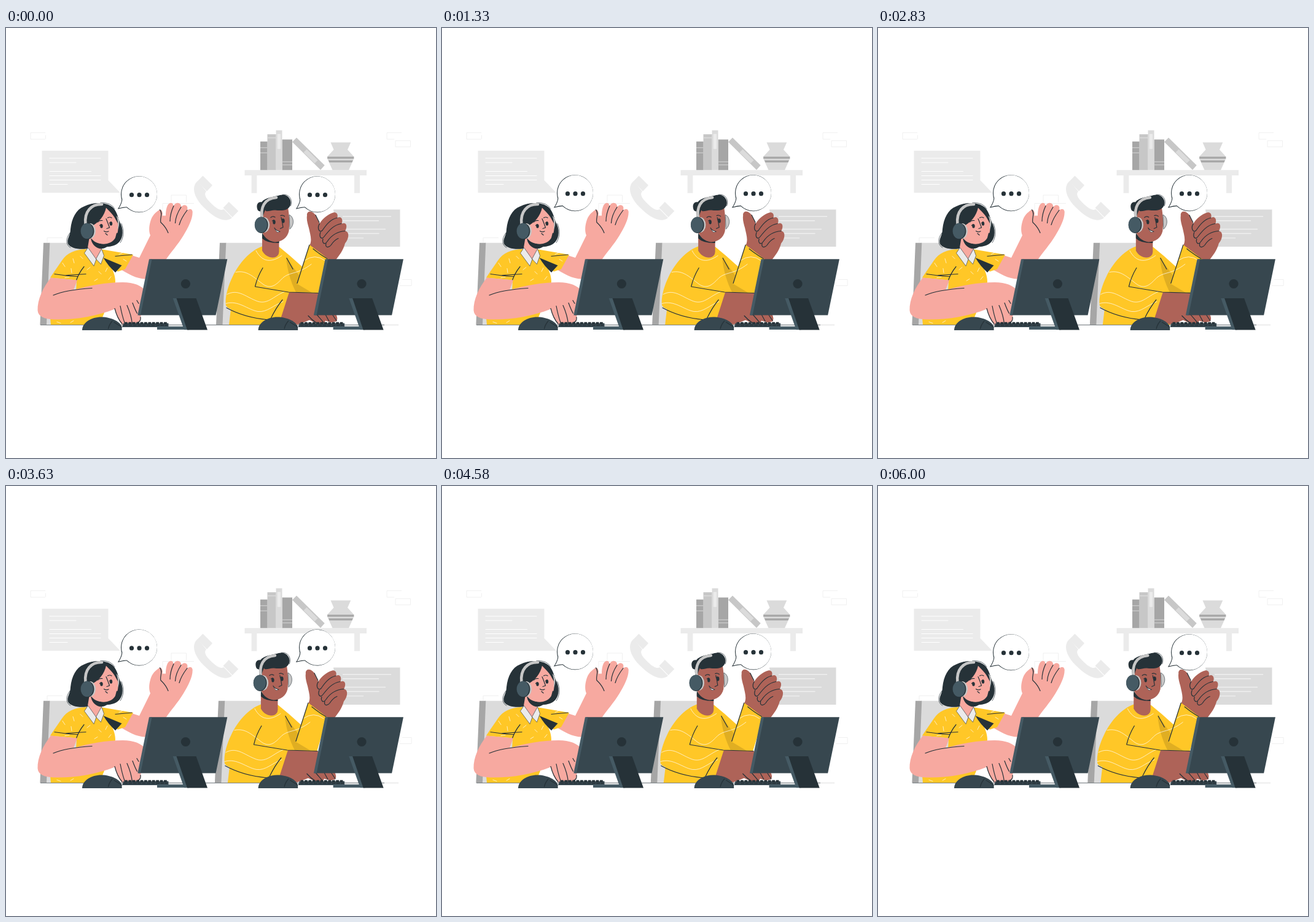
Animation of 700x700 px, one loop 6040 ms. Source, as an HTML page:

```html
<!DOCTYPE html>
<html lang="en">
<head>
<meta charset="utf-8">
<title>Support desk</title>
<style>
  html, body { margin: 0; width: 100%; height: 100%; overflow: hidden; background: #fff; }
  svg { display: block; width: 100vw; height: 100vh; }
  .ink { fill: #263238; }
  .slate { fill: #37474f; }
  .steel { fill: #455a64; }
  .g1 { fill: #ebebeb; }
  .g2 { fill: #dbdbdb; }
  .g3 { fill: #c7c7c7; }
  .g4 { fill: #a6a6a6; }
  .yellow { fill: #ffc727; }
  .rose { fill: #f7a9a0; }
  .brown { fill: #ae6358; }
  .line { fill: none; stroke: #263238; stroke-width: 1.2; stroke-linecap: round; stroke-linejoin: round; }
  .pale { fill: none; stroke: #fff; stroke-width: 1; stroke-linecap: round; }
  .thin { stroke-width: .7; }
  .faint { fill: none; stroke: #f0f0f0; stroke-width: 1; }
  .band { fill: none; stroke: #c7c7c7; stroke-width: 4.6; stroke-linecap: round; }
</style>
</head>
<body>
<svg viewBox="0 .5 700 700">
  <defs>
    <g id="bubble">
      <circle class="ink" cx="216.5" cy="271.2" r="29.5"/>
      <path class="ink" d="M188.6 279 Q187.5 287 181.8 295.3 Q190 293.2 197.5 292.6Z"/>
      <circle cx="217" cy="271.1" r="29" fill="#fff"/>
      <path d="M189.6 279 Q188.5 287 183.8 293.8 Q190 291.9 198.5 291.4Z" fill="#fff"/>
      <circle class="ink" cx="204.5" cy="272.2" r="3.6"/>
      <circle class="ink" cx="217" cy="272.2" r="3.6"/>
      <circle class="ink" cx="229.5" cy="272.2" r="3.6"/>
    </g>
    <g id="desk">
      <path class="slate" d="M189 487.5 L191 481 H264.5 V487.5Z"/>
      <path d="M193 481 H263" stroke="#263238" stroke-width="3.4" stroke-dasharray="4.8 1.6"/>
      <path d="M192 484.5 H263" stroke="#263238" stroke-width="1.6" stroke-dasharray="6 1.4"/>
      <path class="steel" d="M246 486.3 H294 V491.5 H246Z"/>
      <path class="slate" d="M235 376.7 H360.3 L341.5 468 H216Z"/>
      <path class="steel" d="M233 376.7 H237.6 L219 468 H214.3Z"/>
      <circle class="ink" cx="292.4" cy="417" r="7.6"/>
      <path class="steel" d="M271.7 440.6 H280 L298 491.8 H290Z"/>
      <path class="ink" d="M277.5 440.6 H309.5 L328 492 H295Z"/>
      <path class="slate" d="M124 492.5 C124 480 139 471 155 471 C172 471 187 479 188.600 488 V492.500Z"/>
      <path class="line" d="M173 477.5 Q168 483 166.5 490 M176 479.5 L188 487"/>
    </g>
    <g id="cup">
      <ellipse class="g3" cx="137" cy="331" rx="9" ry="12.5"/>
      <ellipse class="ink" cx="132.6" cy="331.2" rx="10.8" ry="13.2"/>
      <ellipse class="steel" cx="131.8" cy="331" rx="10.2" ry="12.7"/>
    </g>
  </defs>

  <!-- wall -->
  <path class="faint" d="M64 171 H40 V181.5 H64 M64.5 175 V181 M644 171 H620 V181.5 H632 M634 184 H658.5 V194 H634Z M269 284 V272.5 H293.5 V284 M67 350 V342 H92 M255 296 V286 H306 M645 410 H660 V420 H641"/>
  <path class="g1" d="M58.5 200.300 H166.5 V248.500 L186 268.700 H58.500Z"/>
  <path class="pale" d="M71 212.500 H154 M71 219.500 H114 M71 234 H138.500 M71 241 H154 M71 248 H154 M71 255 H100"/>
  <path class="g1" d="M388.5 231.700 H587 V240.500 H576 V269.300 H567 V240.500 H408.400 V269.300 H399.600 V240.500 H388.500Z"/>
  <path class="g4" d="M414 185.200 H425.700 V231.700 H414Z M449.500 182 H466 V231.700 H449.500Z"/>
  <path class="g3" d="M425.500 173.600 H439.700 V231.700 H425.500Z M414 194.500 H425.500 V196 H414Z M414 203 H425.500 V204.500 H414Z M449.500 217.500 H466 V219 H449.500Z M449.500 222.500 H466 V224 H449.500Z"/>
  <path class="g2" d="M439.500 167 H449.500 V231.700 H439.500Z M425.500 178.500 H439.500 V180 H425.500Z"/>
  <path class="g1" d="M441.700 173 H447.200 V197.300 H441.700Z"/>
  <path class="g3" d="M473 179 L518.700 224 L512 231.500 L466 186Z"/>
  <path class="g2" d="M489.500 198 L507.500 215.700 L502.500 220.800 L484.500 203Z"/>
  <path class="g2" d="M528.500 186.700 H561.300 L556 198.400 L566.400 210 V213 L558 231.700 H531.500 L523 213 V210 L533.600 198.400Z"/>
  <path class="g4" d="M523.200 209.900 H566.300 V213.200 H523.200Z M525 216 H564.800 L563.400 219.300 H526.400Z"/>
  <g class="g1">
    <path d="M312 249.500 C301 259 306 276 321 291.500 C338 309 356 319 368 309.500 L354.500 295.500 C349 299 341 293 334 286 C327 279 321 272 326 266.500Z"/>
    <path d="M320.500 240.900 L336 256.500 L327 266.200 L311.500 250.200Z M362.800 283.500 L378.300 298.600 L368.500 308.400 L353.600 293.200Z"/>
  </g>
  <path class="g2" d="M533 295.900 H641.500 V356.400 H541Z"/>
  <path d="M548 307.300 H627 M548 314.300 H607 M548 328 H618 M548 335 H607.500 M548 342.400 H582" stroke="#f0f0f0" stroke-width="1.400"/>
  <path d="M56 483.900 H616" stroke="#5b6468" stroke-width=".9"/>
  <path d="M616 483.900 H639" stroke="#d6d6d6" stroke-width=".8"/>

  <!-- woman -->
  <path class="g2" d="M70 350.300 H128 V483.500 H65Z"/>
  <path class="g4" d="M61 350.300 H71.300 L66 483.500 H55.400Z"/>
  <path class="ink" d="M127 291 C143 283 164 284 173 292 C181 299 182 311 187 320 C192 332 190 345 182 351 C175 357 160 358 150 356 L138 359 C121 362 106 360 101 352 C98 344 105 339 105 328 C107 310 114 296 127 291Z"/>
  <path class="line thin" d="M188 319 C193 332 191 343 186 350 M104 334 C97 343 97 354 105 358 M154 285 Q171 284 177 295"/>
  <path class="rose" d="M203 370 L217 374.500 L235 338 C232 331 233 322 235.500 314 C238 306 243 301 249 297 C253 294 256 300 254.500 306 L260 306 C260 297 262 287 267 285.500 C271 284.500 273 287 272 292 C274 286 280 283 284 287.500 C285.500 289 285 291 284.500 293 C287 288 293 287 295 291.500 C296 294 295 296 294.500 298.500 C298 293.500 303 294.500 303.700 299.500 C304 312 296 326 289 338 C280 353 268 366 260 378 L250 405 L228 409 C212 409 199 401 183 391Z"/>
  <path class="yellow" d="M130 360.500 C112 361 99 367 91 379 C83 391 77 399 72 407 L115 411 L114 430 L72 472 L73 483.500 H152 L170 440 L178 414 C178 404 175 398 171 388 L182 397 L194 393 L207 369.500 L157 361Z"/>
  <path class="ink" d="M158.500 374.500 L188.500 387 L178 398.500 C171 392 164 384 158.500 374.500Z"/>
  <path class="rose" d="M136 340 L133 358 C137 369 142 374 146 377 C151 373 155 366 156 360 L158 345Z"/>
  <path class="ink" d="M138 342 C145 351 153 354 171 350 C167 356 160 361 152 359.500 C144 357 139 351 138 342Z"/>
  <path class="rose" d="M163 293 C174 298 179 306 182 316 C184 327 182 339 175 346 C167 354 152 354 144 347 C139 342 140 330 143 321 C151 316 160 307 163 293Z"/>
  <path class="ink" d="M160 289 C165 297 173 301 179 313 L184 322 C184 309 180 299 173 292Z"/>
  <path class="g3" d="M179.500 306 C185 310 186 321 181.500 329 C183 321 182.500 314 179.500 306Z"/>
  <path d="M180 334 C187 336 184 348 176 350Z" class="ink"/>
  <path class="band" d="M129.500 320 C127 299 139 287 156 287.500"/>
  <use href="#cup"/>
  <path class="line" d="M149.500 316.500 Q152 313 157 314 M165.500 309.500 Q169 307.500 172 309.500" stroke-width="2"/>
  <path class="line" d="M163 311 Q166 318 168.500 325.500 L164 327 M159.500 331 Q163 333.500 167 331.500 M162 335 L165 337.500"/>
  <ellipse class="ink" cx="155.500" cy="323" rx="2.200" ry="3.200"/>
  <ellipse class="ink" cx="171" cy="319" rx="2.200" ry="3.200"/>
  <path class="line" d="M152.500 322 L155 320 M168.500 318 L171 316"/>
  <path fill="#ebebeb" stroke="#263238" stroke-width=".6" d="M133.500 358 L127.500 367 L143 388 L147 377Z M155.500 360 L159.500 371 L154.500 385 L146.500 376.500Z"/>
  <path class="line" d="M205 369.500 L178 372 M79 401 Q97 404 117 405 M98 403 L130 401 M127 389 Q118 400 113.500 414"/>
  <path class="pale thin" d="M92 383 l4 6 M109 376 l2 7 M106 392 l1 7 M121 372 l4 4 M132 394 l5 -4 M151 397 l4 4 M165 391 l-3 6 M144 412 l5 -3 M167 410 l4 -5 M184 369 l5 -2 M191 377 l5 3 M96 407 l7 -1 M83 479 l6 2 M105 480 l5 -3"/>
  <path class="rose" d="M73 407 C60 423 51 443 51.500 460 C52 470 62 474.500 78 475 C110 476 147 470 177 458 C179 466 182 474 187 481 C190 485 194 484 193 480 C196 486 202 488 205 483 C209 488 213 484 213 480 C219 480 220 476 219 471 L228 430 C221 419 208 415 190 414.500 C162 415 137 419 110 427 L116 411Z"/>
  <path class="line" d="M77 435.500 C92 429 117 425.500 140 424 M177 457 Q181 473 189 482 M186 453 Q189 469 193 480 M197 452 Q204 468 205.500 482 M206 448 Q210 459 213.500 465 M213.500 480 Q220 479 219 471 M213 444 L216 449"/>
  <path class="line" d="M250.500 296.500 C256 302 250 310 252 317 Q260 324 264 334 M273 290 Q267 303 267 315 M285 292 Q276 306 275.500 318 M295 297 Q285 310 282 321"/>
  <use href="#bubble" class="float"/>

  <!-- man -->
  <g id="man">
    <path class="g2" d="M357 350.300 H440 V483.500 H351Z"/>
    <path class="g4" d="M348 350.300 H358.300 L352.500 483.500 H342Z"/>
    <path class="brown" d="M490 306 C489 298 498 296.500 504 305 L510.500 319 C515 311 525 303 533 301 C539 300 541 305 539 309.500 C546 306 549 312 546.500 319 C555 316 556 324 552 331 C560 332 558 344 552 351 C549 363 542 371 537 378 H510 L494 355 C499 346 495 336 493 326 C491 319 489 312 490 306Z"/>
    <path class="brown" d="M460 430 L510 432 L537 466 Q541 473 538 478 L530 480 L520 477 L517 483 L505 481 L494 476 L476 483 H440Z"/>
    <path class="yellow" d="M417 356 C397 363 379 384 369 405 C361 421 356 440 358 452 Q360 456 366 458 L363 483.500 H474 L447 474 L461 430.500 L508 432.500 L525 377 L494 353.500 L482 389 L463 372 L445 357Z"/>
    <path d="M456 374 L498 432 L472 430.500 C464 415 458 396 456 374Z" fill="#e0ae22"/>
    <path class="yellow" d="M494 353.500 L474 417 L500 432.500 L508 432 L525 377Z"/>
    <path class="pale thin" d="M374 398 C392 394 403 406 419 418 C433 427 442 416 451 407 C463 397 475 402 497 385 M360 434 C377 425 389 437 406 444 C425 453 435 437 453 430 M358 449 C378 443 393 459 410 462 C425 464 436 451 451 446 M407 363 C417 382 432 383 449 371 M486 379 Q503 367 519 379"/>
    <path class="line" d="M418 391 Q409 406 405.500 421.500 Q432 426 460 430.500 L509 432 M359 456 Q388 472 427 475.500 M450 443 Q440 455 430.500 474.500 M494 353.500 L474 416 M500 360 Q511 369 523 376 M457 375 L467 393" stroke-width="1.400"/>
    <path class="brown" d="M417 338 V363 C421 371 429 375 437 374 Q444 372 444.500 365 V340Z"/>
    <path class="ink" d="M417 334 Q425 347 444.500 347 V350.500 Q425 351 417 343Z"/>
    <path class="brown" d="M416 294 L459 292 C461 305 462 318 460.500 331 C458 342 449 348.500 438 349 C427 348 418 340 416 328Z"/>
    <path class="ink" d="M409 295 C407 287 411 283 416 284 C422 276 438 275 446 272.500 C459 269 466 281 463 289 C459 299 447 298 438 297 C430 297 424 301 422 297 C419 303 418 309 416 314 C414 307 414 302 414 299 Q410 299 409 295Z"/>
    <path class="line thin" d="M450 272 C462 270 467 281 463.500 290"/>
    <path class="g3" stroke="#263238" stroke-width=".6" d="M461 304.500 C469 308 470 321 462 328Z"/>
    <path class="band" d="M417 311 C414 293 420 278 440 276.500"/>
    <use href="#cup" x="283.200" y="-10"/>
    <path class="line" d="M431 309 Q434 306 438 308.500 M447 306 Q450 304.500 453.500 307" stroke-width="2.200"/>
    <path class="line" d="M448 309 Q450 317 451 325 L446.500 327 M437 326 Q440 331 446 332"/>
    <path d="M438 328 Q441 331 445 331.500 Q442 336 438 328Z" fill="#fff" stroke="#263238" stroke-width=".7"/>
    <ellipse class="ink" cx="436.500" cy="316.500" rx="2.200" ry="3.400"/>
    <ellipse class="ink" cx="451.500" cy="314.500" rx="2.200" ry="3.400"/>
    <path class="line" d="M433.500 314.500 L436 313 M448.500 312.500 L451 311"/>
    <path class="line" d="M510.500 319 C506 326 510 335 515 330 C521 321 528 312 539 309.500 M512 333 C509 341 514 346 518 340 C525 331 533 321 546 319 M516 344 C514 351 519 354 523 348 C529 339 538 332 552 331 M521 351 C519 358 525 359 529 354 Q534 346 541 343 M504 305 L510 317" stroke-width="1.500"/>
    <path class="line" d="M492 469 Q498 476 506 481 M505 466 Q512 474 517 480 M520 467 L526 478 M532 468 L538 477"/>
  </g>
  <use href="#bubble" class="float" x="290"/>

  <use href="#desk"/>
  <use href="#desk" x="286.600"/>
</svg>
<script>
  const LOOP = 6040, FLOAT = 1500, SHAKE = 6000, DELAY = 500, SCALE = 0.92;
  const SHAKE_STOPS = [0, -1, 2, -4, 4, -4, 4, -4, 2, -1, 0];
  const man = document.getElementById('man');
  const bubbles = document.querySelectorAll('.float');

  // Straight rise and fall between 0 and -10.
  function floatY(t) {
    const p = (t % FLOAT) / FLOAT;
    return -10 * (1 - Math.abs(1 - 2 * p));
  }

  // Sideways shake, linear between evenly spaced stops.
  function shakeX(t) {
    if (t < DELAY) return 0;
    const p = ((t - DELAY) % SHAKE) / SHAKE * 10;
    const i = Math.floor(p);
    return SHAKE_STOPS[i] + (SHAKE_STOPS[i + 1] - SHAKE_STOPS[i]) * (p - i);
  }

  function render(t) {
    man.setAttribute('transform', `translate(${shakeX(t) * SCALE} 0)`);
    for (const b of bubbles) b.setAttribute('transform', `translate(0 ${floatY(t) * SCALE})`);
  }

  const start = performance.now();
  function tick() {
    render((performance.now() - start) % LOOP);
    requestAnimationFrame(tick);
  }
  tick();
</script>
</body>
</html>
```
